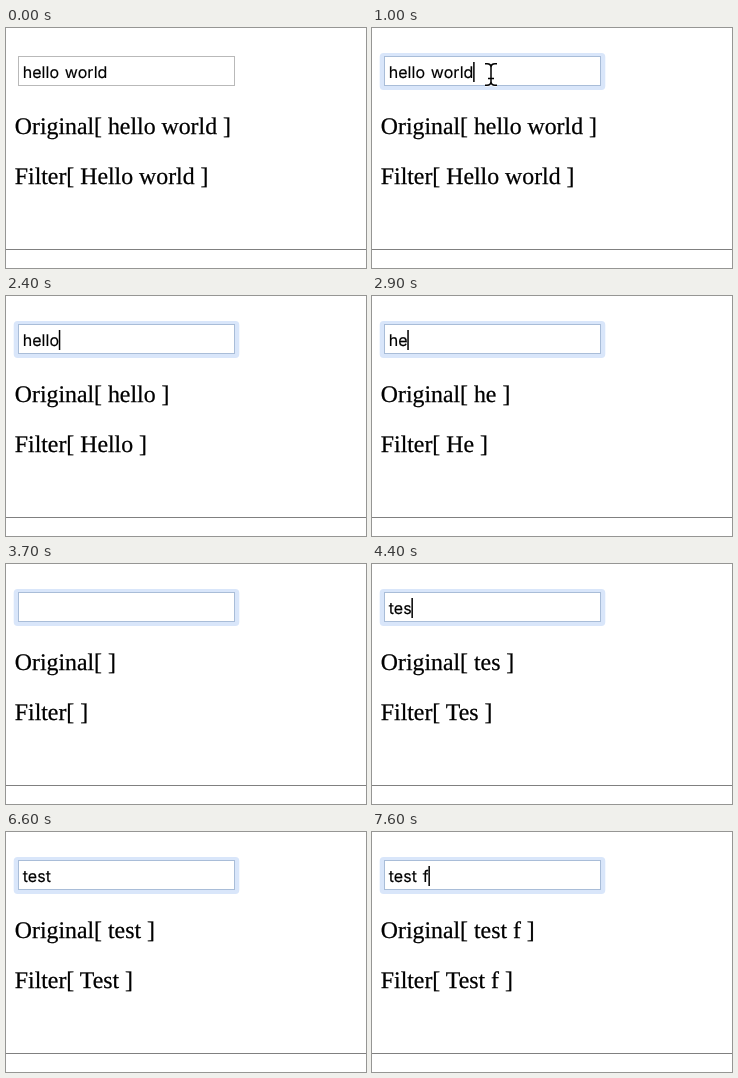
An HTML page that plays this animation: 360x240 px, repeating every 8000 ms.

```html
<!DOCTYPE html>
<html lang="en">
<head>
<meta charset="utf-8">
<title>Capitalize filter</title>
<style>
html, body { margin: 0; width: 100%; height: 100%; overflow: hidden; background: #fff; }
svg { display: block; width: 360px; height: 240px; }
text { white-space: pre; fill: #000; stroke: #000; text-rendering: geometricPrecision; }
.line { font: 23.8px "Liberation Serif", Times, serif; stroke-width: .25px; }
.value { font: 16px Inter, "Liberation Sans", sans-serif; letter-spacing: .05px; word-spacing: 1.2px; stroke-width: .15px; }
</style>
</head>
<body>
<svg viewBox="0 0 360 240">
  <defs>
    <path id="stem" d="M-6 -10.7H-4Q0 -10.7 0 -7Q0 -10.7 4 -10.7H6M0 -7V7M-6 10.7H-4Q0 10.7 0 7Q0 10.7 4 10.7H6M-3 4H3"/>
  </defs>
  <rect id="ring" x="7.7" y="25" width="225.6" height="37" rx="4" fill="#d9e6fa"/>
  <rect id="box" x="12.5" y="28.5" width="216" height="29" fill="#fff"/>
  <text id="value" class="value" x="16.7" y="50.4"></text>
  <rect id="caret" y="34" width="1.5" height="20"/>
  <text id="plain" class="line" x="8.8" y="105.8"></text>
  <text id="filtered" class="line" x="8.8" y="156"></text>
  <path d="M0 221.5H360" stroke="#808080"/>
  <path id="arrow" d="M0 0V18L4.2 14.2L7 20.6L10 19.3L7.2 13H13Z" stroke="#fff" stroke-width="1.2"/>
  <g id="beam" fill="none">
    <use href="#stem" stroke="#fff" stroke-width="3"/>
    <use href="#stem" stroke="#000" stroke-width="1.5"/>
  </g>
</svg>
<script>
const $ = id => document.getElementById(id);
const LOOP = 8000, FOCUS = 1000, TYPING = 1700, BLINK = 500;

// Times at which the last letter is deleted, then at which one is typed.
const deletions = [1700, 1900, 2000, 2200, 2300, 2400, 2600, 2700, 2900, 3100, 3200];
const insertions = [4000, 4200, 4400, 4600, 6100, 7600];
const first = "hello world", second = "test f";

// Pointer: time, x, y, shape.
const pointer = [
  [400, 225, 199, "arrow"],
  [500, 178, 126, "arrow"],
  [600, 134, 68, "arrow"],
  [700, 119, 46.5, "beam"]
];

const passed = (times, t) => times.filter(at => at <= t).length;
const show = (id, on) => $(id).setAttribute("visibility", on ? "visible" : "hidden");
const capitalize = s => s.charAt(0).toUpperCase() + s.slice(1);
const wrap = (label, s) => `${label}[ ${s.trim()}${s ? " " : ""}]`;

function valueAt(t) {
  const typed = passed(insertions, t);
  return typed ? second.slice(0, typed) : first.slice(0, first.length - passed(deletions, t));
}

function caretOn(t) {
  const last = [FOCUS, ...deletions, ...insertions].filter(at => at <= t).pop();
  return last !== undefined && Math.floor((t - last) / BLINK) % 2 === 0;
}

function draw(t) {
  const value = valueAt(t), focused = t >= FOCUS;
  $("value").textContent = value;
  $("plain").textContent = wrap("Original", value);
  $("filtered").textContent = wrap("Filter", capitalize(value));

  show("ring", focused);
  $("box").setAttribute("stroke", focused ? "#a9bdd8" : "#b9b9b9");
  show("caret", caretOn(t));
  $("caret").setAttribute("x", 16.4 + (value ? $("value").getComputedTextLength() : 0));

  const spot = t < TYPING && pointer.filter(p => p[0] <= t).pop();
  for (const shape of ["arrow", "beam"]) {
    show(shape, spot && spot[3] === shape);
    if (spot) $(shape).setAttribute("transform", `translate(${spot[1]} ${spot[2]})`);
  }
}

function frame() {
  draw(performance.now() % LOOP);
  requestAnimationFrame(frame);
}
frame();
</script>
</body>
</html>
```
